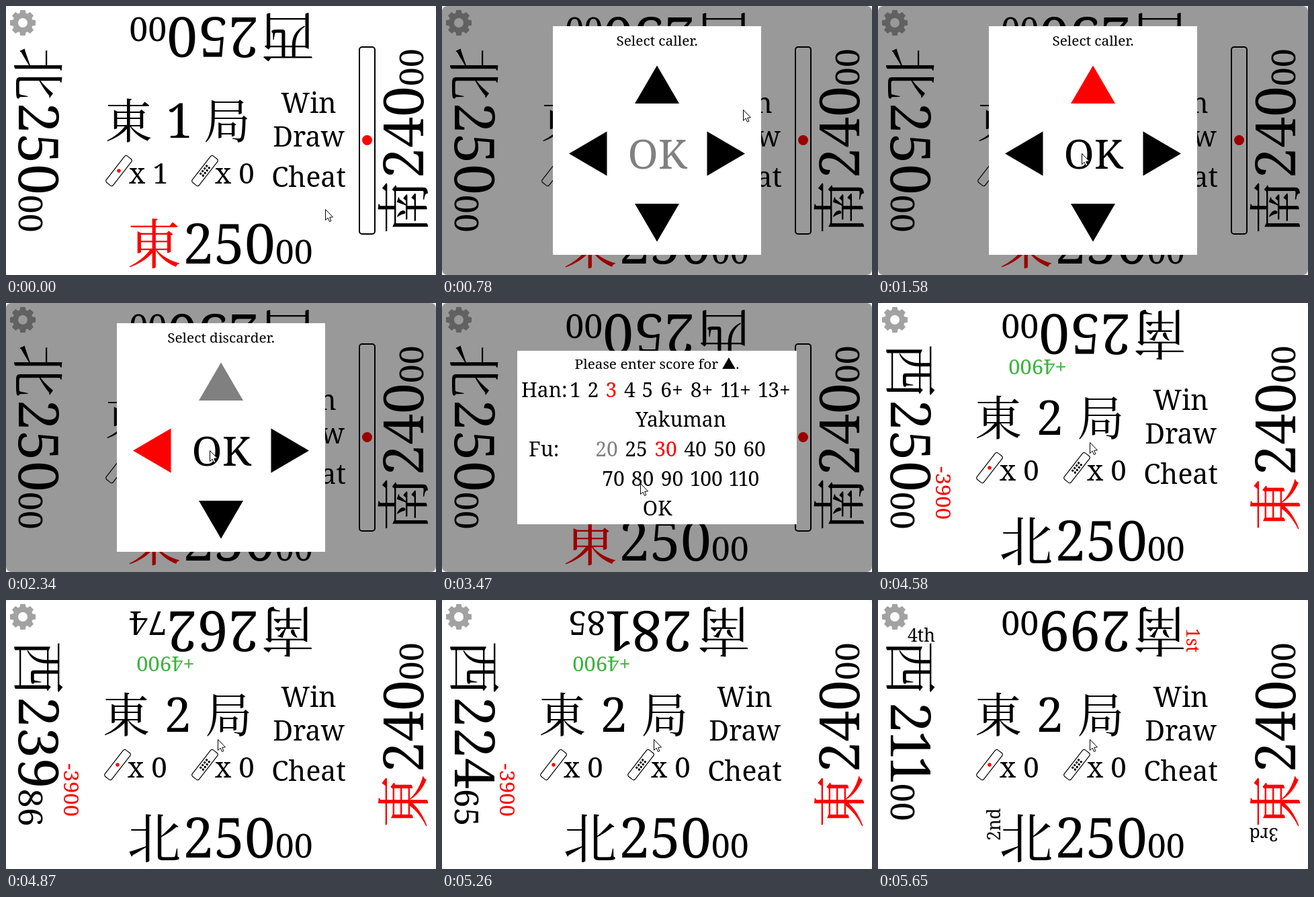
An HTML page with a canvas that plays this animation: 640x400 px, repeating every 6.28 s.

```html
<!DOCTYPE html>
<html lang="ja">
<head>
<meta charset="utf-8">
<title>Mahjong score board</title>
<style>
  html, body { margin: 0; width: 100%; height: 100%; overflow: hidden; background: #fff; }
  canvas { display: block; width: 100vw; height: 100vh; }
</style>
</head>
<body>
<canvas id="stage" width="640" height="400"></canvas>
<script>
const ctx = document.getElementById('stage').getContext('2d');
const LOOP = 6280, W = 640, H = 400;
const SERIF = '"Noto Serif", "Noto Sans CJK JP", "Noto Sans CJK", serif';
const KANJI = '"Noto Serif CJK JP", "Noto Serif CJK SC", "Noto Sans CJK JP", "Noto Sans CJK", serif';
const GREY = '#808080', RED = '#f00', GREEN = '#32cd32';

// Moments of the story, in ms
const AT = {
  caller: 685, pickCaller: 1190, discarder: 1640, pickDiscarder: 2130,
  score: 2440, pickHan: 3000, result: 3690, close: 4480,
  count: 4610, ranks: 5630
};
const FADE = 90, COUNT = 1000;

// Pointer stops: time, x, y
const STOPS = [
  [0, 475, 302], [180, 475, 302], [440, 448, 154], [840, 448, 154],
  [1140, 317, 120], [1310, 317, 120], [1560, 303, 219], [1690, 303, 219],
  [1970, 212, 219], [2150, 212, 219], [2335, 303, 219], [2590, 303, 219],
  [2860, 249, 125], [3248, 249, 125], [3559, 306, 303], [3930, 306, 303],
  [4170, 311, 222], [4260, 315, 207], [LOOP, 315, 207]
];

const clamp = v => Math.max(0, Math.min(1, v));
const smooth = u => u * u * (3 - 2 * u);
const ramp = (t, start) => clamp((t - start) / FADE);
const shown = (t, from, to) => ramp(t, from) * (1 - ramp(t, to));

function text(str, x, y, size, color = '#000', align = 'center', weight = 300, font = SERIF) {
  ctx.font = `${weight} ${size}px ${font}`;
  ctx.fillStyle = color;
  ctx.textAlign = align;
  ctx.fillText(str, x, y);
}

function kanji(ch, x, y, size, color) {
  text(ch, x, y, size, color, 'center', 500, KANJI);
}

// Figures share one advance, except a narrower 1
const advance = (ch, size) => size * (ch === '1' ? 0.46 : 0.559);
const figuresWidth = (str, size) => [...str].reduce((w, ch) => w + advance(ch, size), 0);

function figures(str, x, y, size, color) {
  for (const ch of str) {
    const w = advance(ch, size);
    text(ch, x + w / 2, y, size, color);
    x += w;
  }
}

function figuresMid(str, x, y, size, color) {
  figures(str, x - figuresWidth(str, size) / 2, y, size, color);
}

function placed(x, y, turn, draw) {
  ctx.save();
  ctx.translate(x, y);
  ctx.rotate(turn);
  draw();
  ctx.restore();
}

function disc(x, y, r, color) {
  ctx.fillStyle = color;
  ctx.beginPath();
  ctx.arc(x, y, r, 0, 7);
  ctx.fill();
}

function polygon(points, color) {
  ctx.fillStyle = color;
  ctx.beginPath();
  points.forEach(([x, y]) => ctx.lineTo(x, y));
  ctx.closePath();
  ctx.fill();
}

function frame(x, y, w, h, r, line) {
  ctx.beginPath();
  ctx.roundRect(x, y, w, h, r);
  ctx.fillStyle = '#fff';
  ctx.fill();
  ctx.lineWidth = line;
  ctx.strokeStyle = '#000';
  ctx.stroke();
}

function gear() {
  placed(25, 25, 0, () => {
    for (let i = 0; i < 8; i++) {
      ctx.rotate(Math.PI / 4);
      polygon([[-5, -12], [-3.7, -19], [3.7, -19], [5, -12]], '#a2a2a2');
    }
    ctx.strokeStyle = '#a2a2a2';
    ctx.lineWidth = 8;
    ctx.beginPath();
    ctx.arc(0, 0, 11, 0, 7);
    ctx.stroke();
  });
}

function smallStick(x, y, eight) {
  placed(x, y, -52 * Math.PI / 180, () => {
    frame(-25, -6.5, 50, 13, 3, 1.2);
    if (!eight) return disc(0, 0, 2.7, RED);
    for (let i = 0; i < 8; i++) {
      disc((i % 4 - 1.5) * 4.8, i < 4 ? -2.3 : 2.3, 1.7, '#000');
    }
  });
}

function panel(seat, wind, score, delta, rank) {
  const [x, y, turn] = [
    [320, 354, 0], [592, 200, -Math.PI / 2], [320, 46, Math.PI], [48, 200, Math.PI / 2]
  ][seat];
  placed(x, y, turn, () => {
    kanji(wind, -99.5, 29, 80, wind === '東' ? RED : '#000');
    const big = String(Math.floor(score / 100));
    const small = String(score % 100).padStart(2, '0');
    const bigW = figuresWidth(big, 82);
    const left = 40 - (bigW + figuresWidth(small, 50)) / 2;
    figures(big, left, 29, 82);
    figures(small, left + bigW, 29, 50);
    if (delta) {
      text(delta, 82.5, -38, 31, delta[0] === '+' ? '#3cb43c' : RED);
    }
    if (rank) {
      placed(-138.5, 4, -Math.PI / 2, () =>
        text(rank, 0, 0, 26.5, rank === '1st' ? RED : '#000', 'left', 400));
    }
  });
}

function board(t) {
  const next = t >= AT.close + FADE / 2;
  // Counted in hundredths of the whole change
  const part = Math.round(clamp((t - AT.count) / COUNT) * 100) / 100;
  const ranked = t >= AT.ranks;
  const deltas = next && !ranked ? ['', '', '+4900', '-3900'] : [];
  const ranks = ranked ? ['2nd', '3rd', '1st', '4th'] : [];
  const scores = [25000, 24000, 25000 + Math.round(4900 * part), 25000 - Math.round(3900 * part)];
  const winds = next ? '北東南西' : '東南西北';

  gear();
  scores.forEach((score, i) => panel(i, winds[i], score, deltas[i], ranks[i]));

  kanji('東', next ? 179 : 182.5, 196.5, 70);
  text(next ? '2' : '1', next ? 255.5 : 258, 196, 72);
  kanji('局', next ? 331.5 : 329, 196.5, 70);

  smallStick(next ? 166 : 168, 245, false);
  text(next ? 'x 0' : 'x 1', next ? 181 : 183, 264, 42, '#000', 'left');
  smallStick(296, 245, true);
  text('x 0', 311, 264, 42, '#000', 'left');

  text('Win', 450.5, 158.5, 41);
  text('Draw', 450.5, 208.5, 41);
  text('Cheat', 450.5, 268.5, 41);

  if (!next) {
    frame(526, 61, 23, 278, 4, 2);
    disc(537.5, 199.5, 7.5, RED);
  }
}

function arrow(turn, color) {
  placed(320, 219.5, turn, () => polygon([[0, -131], [-33, -74.5], [33, -74.5]], color));
}

function seatDialog(t) {
  const second = t >= AT.discarder;
  const picked = t >= AT.pickCaller;
  ctx.fillStyle = '#fff';
  ctx.fillRect(165, 30, 310, 340);
  text(second ? 'Select discarder.' : 'Select caller.', 320, 59, 20.8);
  arrow(0, second ? GREY : picked ? RED : '#000');
  arrow(Math.PI / 2, '#000');
  arrow(Math.PI, '#000');
  arrow(-Math.PI / 2, t >= AT.pickDiscarder ? RED : '#000');
  text('OK', 320.5, 242, 61, picked ? '#000' : GREY);
}

function row(items, y, colors) {
  items.forEach(([label, x]) => figuresMid(label, x, y, 30, colors[label]));
}

function scoreDialog(t) {
  const three = t >= AT.pickHan;
  ctx.fillStyle = '#fff';
  ctx.fillRect(112, 71, 416, 258);
  text('Please enter score for ▲.', 320, 98, 20.8);
  text('Han:', 118, 140, 30, '#000', 'left');
  row([['1', 198.5], ['2', 225], ['3', 252], ['4', 279.5], ['5', 306], ['6+', 342],
    ['8+', 386.5], ['11+', 437.5], ['13+', 495]], 140, { [three ? '3' : '1']: RED });
  text('Yakuman', 355.5, 184, 30);
  text('Fu:', 129, 228, 30, '#000', 'left');
  row(['20', '25', '30', '40', '50', '60'].map((n, i) => [n, 245 + 44 * i]), 228,
    { 20: GREY, 25: three ? '#000' : GREY, 30: RED });
  row([['70', 255], ['80', 298.5], ['90', 342.5], ['100', 394], ['110', 450]], 272, {});
  text('OK', 320.5, 316, 30);
}

function resultDialog() {
  disc(320, 200, 155, '#fff');
  placed(320, 98, Math.PI, () => text('+4900', 0, 11, 31, GREEN));
  placed(217.5, 201, Math.PI / 2, () => text('-3900', 0, 11, 31, '#e62828'));
  text('OK', 320.5, 227, 61);
}

function layer(alpha, draw) {
  if (alpha <= 0) return;
  ctx.save();
  ctx.globalAlpha = alpha;
  draw();
  ctx.restore();
}

function pointer(t) {
  const i = STOPS.findIndex(s => s[0] > t);
  const [t0, x0, y0] = STOPS[i - 1], [t1, x1, y1] = STOPS[i];
  const u = smooth((t - t0) / (t1 - t0));
  const x = Math.round(x0 + (x1 - x0) * u), y = Math.round(y0 + (y1 - y0) * u);
  placed(x + 0.5, y + 0.5, 0, () => {
    polygon([[0, 0], [0, 16], [3.6, 12.6], [6, 18], [8.4, 17], [6.2, 11.8], [11, 11.4]], '#fff');
    ctx.lineWidth = 1;
    ctx.strokeStyle = '#000';
    ctx.stroke();
  });
}

function draw(t) {
  ctx.fillStyle = '#f4f4f4';
  ctx.fillRect(0, 0, W, H);
  ctx.save();
  ctx.beginPath();
  ctx.roundRect(0, 0, W, H, 8);
  ctx.clip();
  ctx.fillStyle = '#fff';
  ctx.fillRect(0, 0, W, H);
  board(t);
  layer(shown(t, AT.caller, AT.close), () => {
    ctx.fillStyle = 'rgba(0, 0, 0, 0.4)';
    ctx.fillRect(0, 0, W, H);
  });
  layer(shown(t, AT.caller, AT.score), () => seatDialog(t));
  layer(shown(t, AT.score, AT.result), () => scoreDialog(t));
  layer(shown(t, AT.result, AT.close), resultDialog);
  ctx.restore();
  pointer(t);
}

function tick() {
  draw(performance.now() % LOOP);
  requestAnimationFrame(tick);
}
tick();
</script>
</body>
</html>
```
